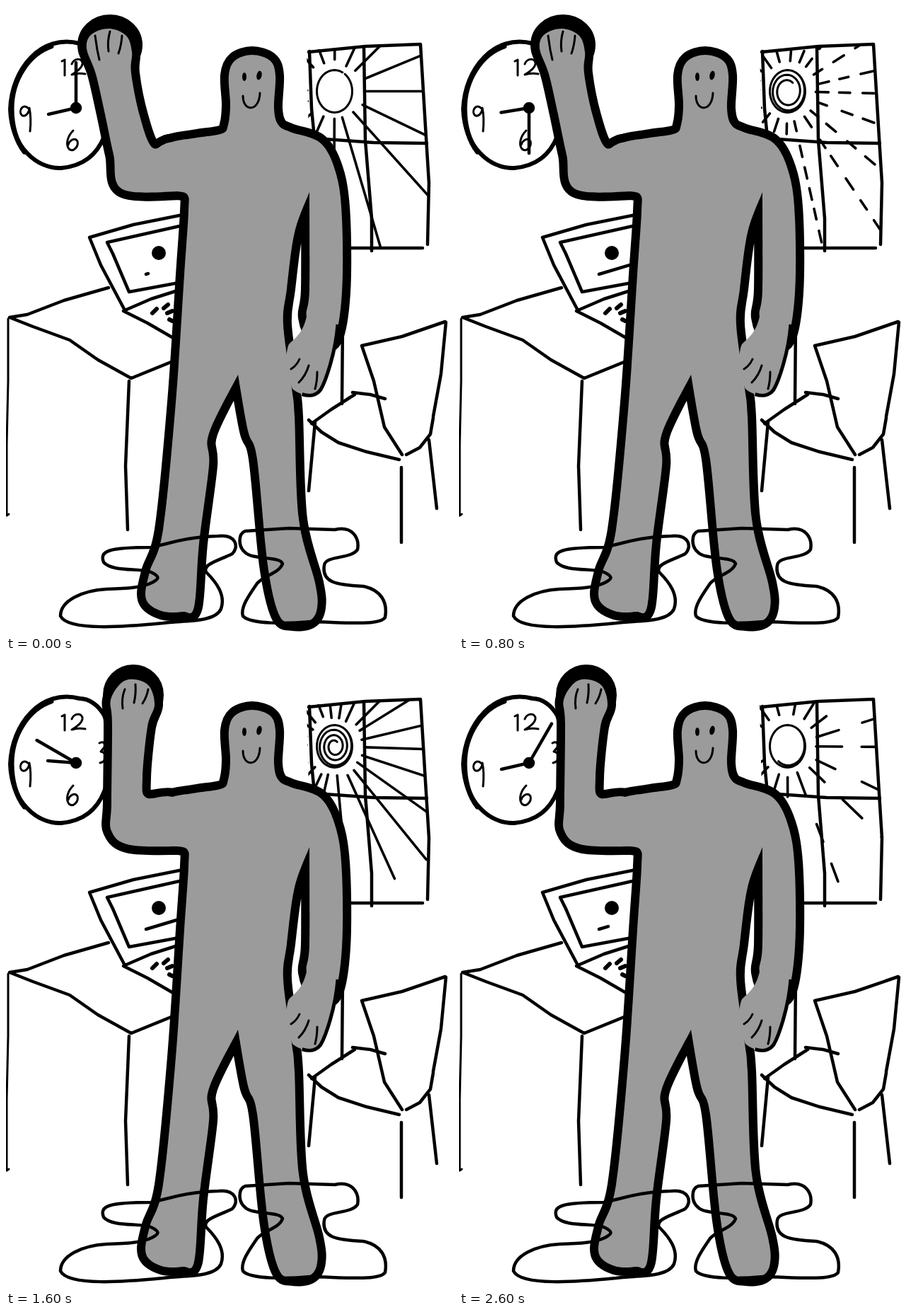
Write an HTML page that moves like this. It is 632x886 px and loops after 2800 ms.

```html
<!DOCTYPE html>
<html lang="en">
<head>
<meta charset="utf-8">
<title>Waving figure</title>
<style>
html, body { margin: 0; width: 100%; height: 100%; overflow: hidden; background: #fff; }
svg { display: block; width: 632px; height: 886px; }
.ink { fill: none; stroke: #000; stroke-width: 4.5; stroke-linecap: round; stroke-linejoin: round; }
.thin { stroke-width: 3; }
.edge { fill: #000; stroke: #000; stroke-width: 24; stroke-linejoin: round; }
.skin { fill: #9b9b9b; }
.off { display: none; }
</style>
</head>
<body>
<svg viewBox="0 0 632 886">
<defs>
  <clipPath id="pane"><path d="M425 62L587 55L598 250L595 340L432 340Z"/></clipPath>
  <path id="body" data-pts="306 180 314 168 317 140 315 98 324 77 348 69 373 77 381 98 379 145 385 168 402 178 445 194 467 238 475 300 475 405 464 470 440 474 425 440 429 400 429 263 429 263 408 320 397 400 392 450 404 540 408 580 414 725 437 815 440 850 430 868 405 871 386 860 370 790 355 640 342 600 328 521 328 521 287 604 287 650 273 760 266 849 250 856 220 855 198 838 203 800 222 740 240 560 252 380 258 290 256 266 235 258 215 225 215 202 235 192 270 186"/>
  <path id="armL" data-pts="127 96 114 60 121 40 146 32 170 42 178 65 177 95 189 155 207 200 235 193 275 215 270 262 249 262 165 259 152 210 140 153"/>
  <path id="armR" data-pts="150 88 148 55 163 31 181 26 202 35 210 62 200 93 193 165 198 193 235 192 275 215 270 262 249 262 175 260 149 240 149 200"/>
</defs>

<!-- clock -->
<g class="ink">
  <path stroke-width="6" d="M104 53C50 39 8 88 6 146C8 200 44 230 78 229C112 226 130 207 139 184C150 156 150 104 139 77C131 63 118 53 104 53"/>
  <path stroke-width="7" d="M64 57C32 68 8 104 8 145C8 168 14 190 26 206"/>
  <path class="thin" d="M79 78L83 76L83 98M93 82C96 73 109 73 108 82C107 89 98 94 93 97Q102 94 112 96"/>
  <path class="thin" d="M32 145C25 137 17 147 22 154C27 158 33 151 33 144Q36 158 34 177"/>
  <path class="thin" d="M95 176C87 184 84 195 89 202C95 207 103 199 101 191C97 185 90 190 88 196"/>
  <path class="thin" d="M132 116Q141 112 139 122L134 128Q144 130 138 142L133 144"/>
  <path id="hour" d="M99 144V104"/>
  <path id="minute" d="M99 144V80"/>
  <circle cx="99" cy="144" r="6" fill="#000"/>
</g>

<!-- desk and laptop -->
<g class="ink">
  <path d="M5 440L30 436L82 416L145 398M5 440L38 453L90 472L130 500L177 526L236 502"/>
  <path d="M174 530L169 650L172 740"/>
  <path class="thin" d="M3 442L3 530L1 620L1 720L4 718"/>
  <path d="M250 295L180 309L118 327L134 366L168 430L205 414L246 401M166 431L200 448L238 470"/>
  <path d="M250 310L143 334L151 350L174 404L250 390"/>
  <path stroke-width="6" d="M207 434L213 428M223 427L229 422M228 434L235 431M231 443L235 445"/>
  <path id="bar"/>
</g>
<circle cx="216" cy="349" r="10"/>

<!-- window -->
<g class="ink">
  <path d="M429 64L432 145L436 186M428 65L508 57L586 54L593 170L598 250L596 337"/>
  <path d="M436 187L520 193L595 194M506 58L508 190L517 300L517 346M487 342L589 342"/>
  <path id="sun" class="thin"/>
  <path id="rays" stroke-width="3.6" clip-path="url(#pane)"/>
</g>

<!-- chair -->
<g class="ink">
  <path d="M476 448L475 562M432 590L460 570L493 549M490 546L515 549L536 555M428 585L446 602L470 617L510 630L556 641"/>
  <path d="M621 446L560 467L503 480L520 530L535 595L560 634M622 447L615 520L604 580M604 582L600 605L585 624L566 634"/>
  <path d="M559 652L559 758M598 613L609 710M437 588L428 685"/>
</g>

<!-- figure -->
<g class="edge">
  <g class="left"><use href="#armL"/><ellipse cx="147" cy="55" rx="34" ry="31"/></g>
  <g class="right"><use href="#armR"/><ellipse cx="180" cy="48" rx="31" ry="31"/></g>
  <use href="#body"/>
</g>
<g class="skin">
  <use class="left" href="#armL"/>
  <use class="right" href="#armR"/>
  <use href="#body"/>
  <path d="M469 450C466 490 452 530 445 542C435 556 416 550 405 541C396 520 394 490 400 478C412 466 420 462 426 435" stroke="#000" stroke-width="5" stroke-dasharray="125 400"/>
</g>

<!-- face, fingers, slippers -->
<ellipse cx="337" cy="100" rx="3" ry="6"/>
<ellipse cx="358" cy="98" rx="3.6" ry="6.5" transform="rotate(12 358 98)"/>
<g class="ink thin">
  <path d="M335 127C335 150 358 150 359 123"/>
  <path d="M403 513Q411 508 415 499M414 532Q424 522 428 508M437 541Q440 530 440 517"/>
  <path class="left" d="M126 42L129 62L132 76M147 36Q143 50 145 64M164 42Q163 56 159 67"/>
  <path class="right" d="M168 40Q163 52 165 67M183 33Q184 46 181 59M201 40Q199 51 193 60"/>
</g>
<g class="ink">
  <path d="M205 765C230 760 255 750 300 749C325 746 330 764 320 774C300 784 277 789 283 800C297 814 311 832 304 852C295 872 250 868 222 872C170 877 88 884 77 862C77 840 108 826 142 824C172 823 192 822 206 815C218 809 217 806 205 800C190 794 150 800 138 786C132 770 145 765 205 765Z"/>
  <path d="M338 742L400 738L465 740C490 734 500 752 497 768C488 782 452 776 450 790C446 814 465 818 505 820C530 825 540 842 536 864C528 876 480 871 430 870C400 873 345 874 335 862C331 850 344 832 355 816C365 804 386 802 391 788C387 777 348 783 338 772C328 764 328 746 338 742Z"/>
</g>
</svg>
<script>
const STEP = 200, LAST = 7;
const ARMS = 'LRLRLRRL';
const DASH = [400, 32, 26, 46, 16, 70, 150, 400];
const SUN = { x: 464.5, y: 120.5 };
const $ = id => document.getElementById(id);
const all = sel => document.querySelectorAll(sel);

// Closed smooth outline through a ring of points.
function outline(text) {
  const n = text.split(' ').map(Number), len = n.length / 2;
  const at = i => { const k = (i + len) % len * 2; return [n[k], n[k + 1]]; };
  let d = 'M' + at(0);
  for (let i = 0; i < len; i++) {
    const [a, b, c, e] = [at(i - 1), at(i), at(i + 1), at(i + 2)];
    const c1 = b.map((v, j) => v + (c[j] - a[j]) / 6);
    const c2 = c.map((v, j) => v - (e[j] - b[j]) / 6);
    d += `C${c1} ${c2} ${c}`;
  }
  return d + 'Z';
}

function random(seed) {
  return () => {
    seed = (seed * 16807 + 11) % 2147483647;
    return seed / 2147483647;
  };
}

const polar = (a, rx, ry = rx) =>
  (SUN.x + rx * Math.cos(a)).toFixed(1) + ' ' + (SUN.y + ry * Math.sin(a)).toFixed(1);

// One full ring, then a spiral winding inwards.
function spiral(turns) {
  const pts = [];
  for (let t = 0; t <= turns; t += 0.025) {
    const r = 1 - 0.25 * Math.max(0, t - 1);
    pts.push(polar((t - 0.15) * 2 * Math.PI, 25 * r, 30 * r));
  }
  return 'M' + pts.join('L');
}

// Spokes around the sun, broken into dashes.
function spokes(count, dash, seed) {
  const rnd = random(seed * 7919 + 5);
  let d = '';
  for (let i = 0; i < count; i++) {
    const a = (i + 0.3 * rnd()) / count * 2 * Math.PI;
    let r = 38 + 8 * rnd();
    while (r < 270) {
      const end = r + dash * (0.8 + 0.4 * rnd());
      d += `M${polar(a, r)}L${polar(a, end)}`;
      r = end + dash * (0.8 + 0.6 * rnd());
    }
  }
  return d;
}

function show(k) {
  const minutes = Math.max(5 * k, 10 * k - 10);
  const hour = 257 + 30 * (minutes / 60) ** 3;
  $('minute').setAttribute('transform', `rotate(${minutes * 6} 99 144)`);
  $('hour').setAttribute('transform', `rotate(${hour} 99 144)`);
  const load = Math.min(50, 3 + 10 * k);
  $('bar').setAttribute('d', `M198 379l${load} ${-0.3 * load}`);
  $('sun').setAttribute('d', spiral(1 + k / 2));
  $('rays').setAttribute('d', spokes(16 + k, DASH[k], k));
  all('.left').forEach(e => e.classList.toggle('off', ARMS[k] !== 'L'));
  all('.right').forEach(e => e.classList.toggle('off', ARMS[k] !== 'R'));
}

all('[data-pts]').forEach(p => p.setAttribute('d', outline(p.dataset.pts)));
const start = performance.now();
let shown = -1;
function tick() {
  const slot = Math.floor((performance.now() - start) / STEP) % (2 * LAST);
  const k = LAST - Math.abs(LAST - slot);
  if (k !== shown) show(shown = k);
  requestAnimationFrame(tick);
}
tick();
</script>
</body>
</html>
```
